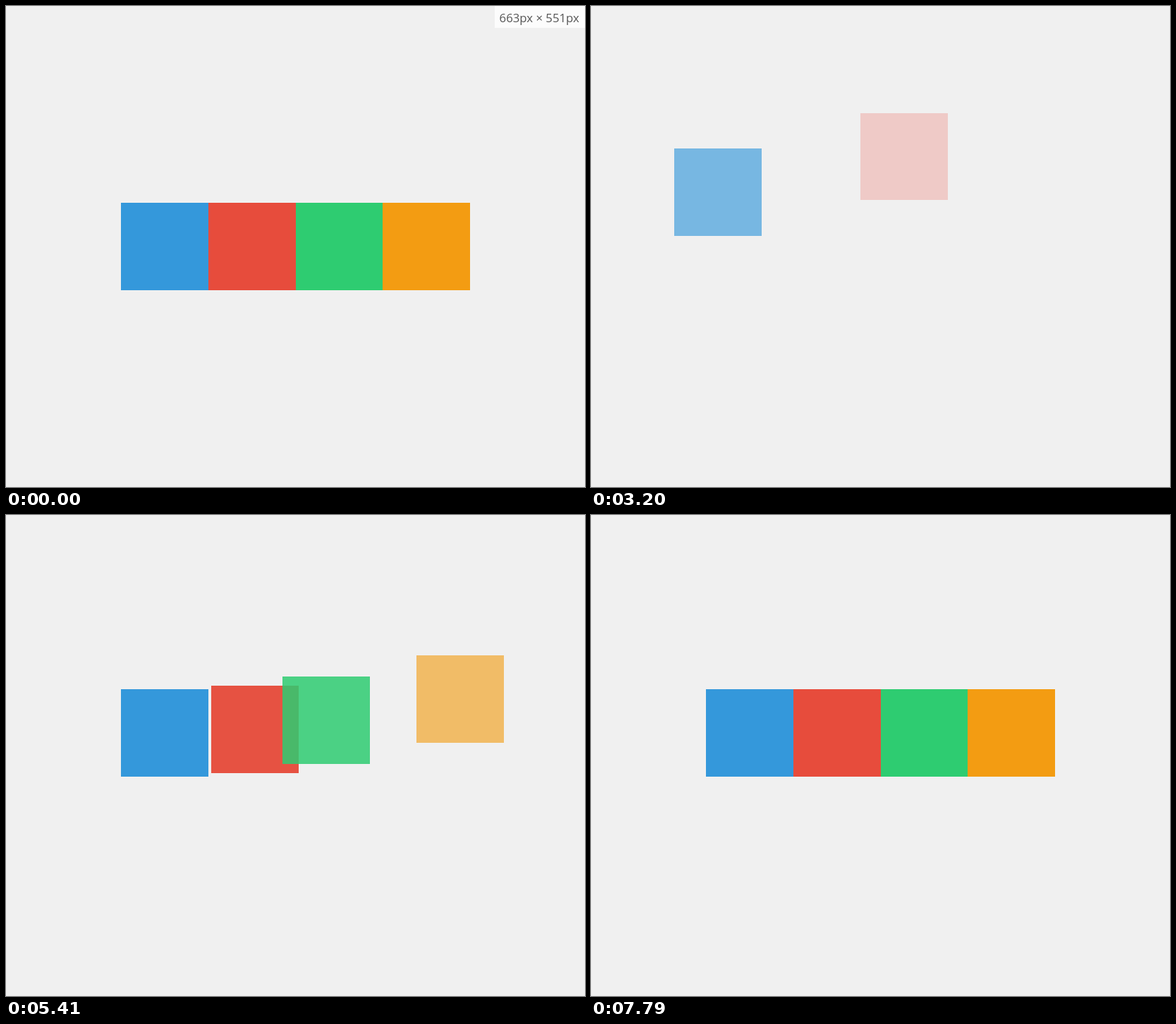
Write an HTML page that moves like this. It is 821x682 px and loops after 7940 ms.

```html
<!DOCTYPE html>
<html lang="en">
<head>
<meta charset="utf-8">
<title>Sliding squares</title>
<style>
  html, body { margin: 0; width: 100%; height: 100%; overflow: hidden; background: #f0f0f0; }
  svg { display: block; width: 100%; height: 100%; }
  text { font: 16.75px "Open Sans", "Noto Sans", sans-serif; fill: #555; }
</style>
</head>
<body>
<svg viewBox="0 0 821 682">
  <rect width="821" height="682" fill="#f0f0f0"/>
  <g id="squares" shape-rendering="crispEdges"></g>
  <g id="label">
    <rect x="693" width="128" height="31" fill="#fcfcfc"/>
    <text id="size" x="699.6" y="22.5"></text>
  </g>
</svg>
<script>
const LOOP = 7940;
const SIDE = 123.83;
const LEFT = 410.5 - 2 * SIDE;
const STAGGER = 0.2;
const SLIDE_START = 2169, STEP = 78.95, LAST_STEP = 71;
const CLEAR = 1550, LABEL_END = 1150;

// Pace of the slide: [step, progress of the first square]
const PACE = [[0, 0.1057], [13, 0.371], [29, 0.704], [41, 0.956], [57, 1.28], [71, 1.6]];

const byId = id => document.getElementById(id);
const label = byId('label'), size = byId('size');
const clamp = v => Math.min(1, Math.max(0, v));

const squares = ['#3498db', '#e74c3c', '#2ecc71', '#f39c12'].map(fill => {
  const el = document.createElementNS('http://www.w3.org/2000/svg', 'rect');
  el.setAttribute('width', SIDE);
  el.setAttribute('height', SIDE);
  el.setAttribute('fill', fill);
  return byId('squares').appendChild(el);
});

// cubic-bezier(.25, .1, .25, 1)
function ease(x) {
  if (x <= 0 || x >= 1) return clamp(x);
  let lo = 0, hi = 1;
  for (let i = 0; i < 24; i++) {
    const s = (lo + hi) / 2;
    if (0.75 * s * (1 - s) + s ** 3 < x) lo = s; else hi = s;
  }
  return 0.3 * lo * (1 - lo) ** 2 + 3 * lo * lo * (1 - lo) + lo ** 3;
}

function progressAt(t) {
  const k = Math.min(LAST_STEP, Math.floor((t - SLIDE_START) / STEP));
  if (k < 0) return 0;
  const i = PACE.findIndex(([step]) => step >= k) || 1;
  const [k0, u0] = PACE[i - 1], [k1, u1] = PACE[i];
  return u0 + (u1 - u0) * (k - k0) / (k1 - k0);
}

function place(i, p, top) {
  const gap = (1 - p) * SIDE;
  const side = i % 2 ? 1 : -1;
  squares[i].setAttribute('x', LEFT + i * SIDE + side * gap);
  squares[i].setAttribute('y', top - gap);
  squares[i].setAttribute('opacity', p);
}

function draw(t) {
  const height = t < 90 ? 551 : t < 160 ? 525 : 499;
  const top = 247 + (height - 499) * 0.618;
  const u = progressAt(t);
  squares.forEach((_, i) => place(i, t < CLEAR ? 1 : ease(u - i * STAGGER), top));
  label.style.display = t < LABEL_END ? '' : 'none';
  size.textContent = `663px × ${height}px`;
}

const begin = performance.now();
function tick() {
  draw((performance.now() - begin) % LOOP);
  requestAnimationFrame(tick);
}
tick();
</script>
</body>
</html>
```
